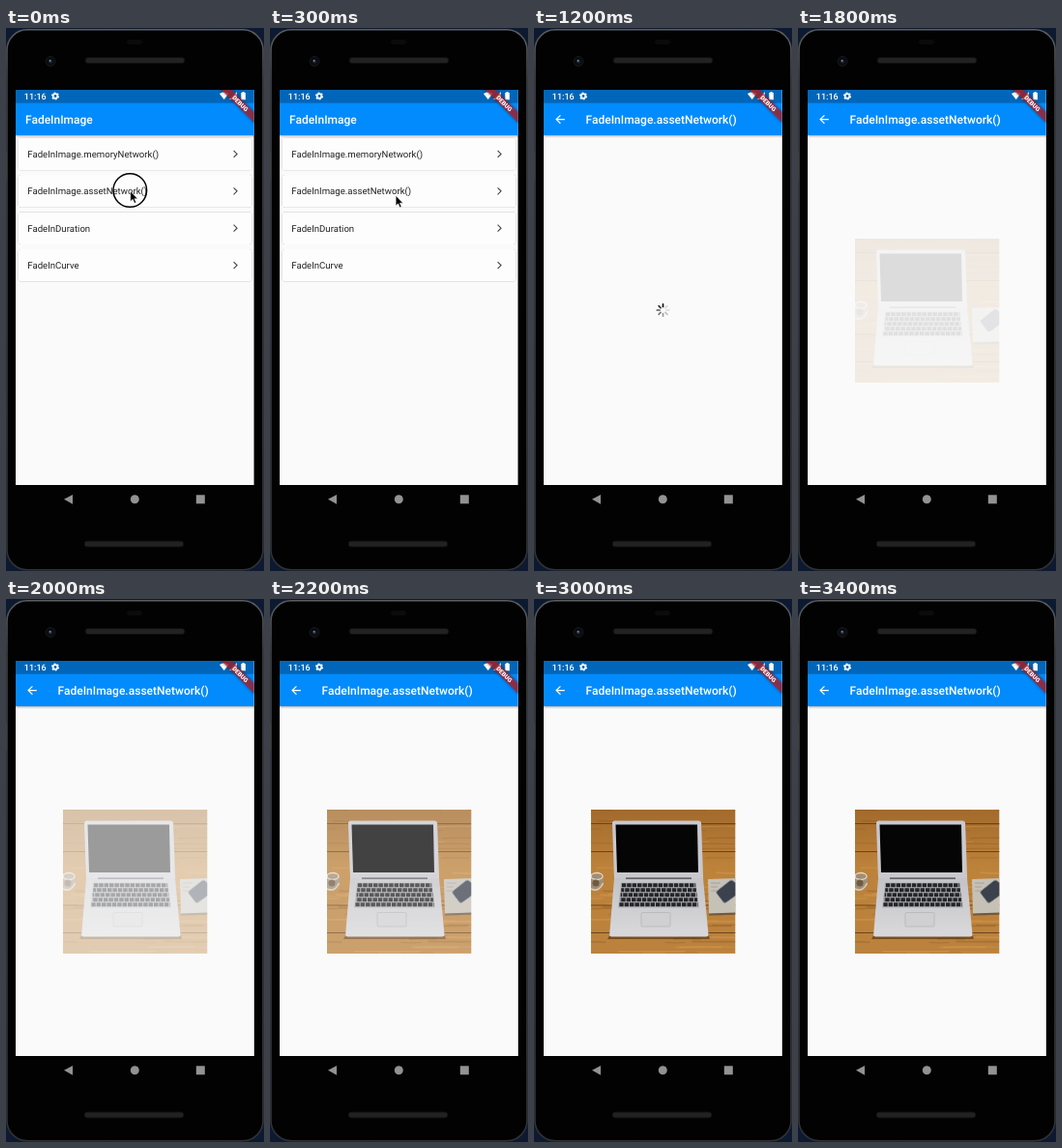
Write an HTML page that moves like this. It is 267 by 562 pixels and loops after 3500 ms.

```html
<!DOCTYPE html>
<html lang="en">
<head>
<meta charset="utf-8">
<title>FadeInImage demo</title>
<style>
  html, body { margin: 0; width: 100%; height: 100%; overflow: hidden; background: #0d1930; }
  svg { display: block; width: 267px; height: 562px; }
  text { font-family: Roboto, sans-serif; text-rendering: geometricPrecision; }
  .title { font-size: 12px; font-weight: 500; fill: #fff; }
  .item { font-size: 9.6px; fill: #222; }
  .card { fill: #fdfdfd; filter: drop-shadow(0 .6px .7px #0006); }
  .bar { fill: #028bfd; filter: drop-shadow(0 1px 1.2px #0005); }
</style>
</head>
<body>
<svg viewBox="0 0 267 562">
  <defs>
    <clipPath id="screen"><rect x="10" y="64" width="246.6" height="409"/></clipPath>
    <clipPath id="frame"><rect x="59" y="218" width="149.3" height="149"/></clipPath>
    <linearGradient id="rim" x2="0" y2="1">
      <stop offset="0" stop-color="#5c5d5f"/><stop offset=".1" stop-color="#3d3e40"/>
      <stop offset="1" stop-color="#303133"/>
    </linearGradient>
    <linearGradient id="wood" x2="0" y2="1">
      <stop offset="0" stop-color="#a26a2c"/><stop offset=".4" stop-color="#bd823a"/>
      <stop offset="1" stop-color="#bb823d"/>
    </linearGradient>
    <linearGradient id="metal" x2="0" y2="1">
      <stop offset="0" stop-color="#c3c3c8"/><stop offset="1" stop-color="#d9d8da"/>
    </linearGradient>
  </defs>

  <!-- phone -->
  <rect width="267" height="562" fill="#0d1930"/>
  <path d="M0 128h1.5v29H0z" fill="#4a4b4d"/>
  <rect x="1" y="1.8" width="265" height="559" rx="21" fill="#020202" stroke="url(#rim)" stroke-width="1.6"/>
  <rect x="125" y="12" width="16" height="5" rx="2.5" fill="#0b0b0d"/>
  <rect x="82" y="30.5" width="103" height="6" rx="3" fill="#222223" stroke="#0e0e0f"/>
  <rect x="81" y="531" width="103" height="6" rx="3" fill="#222223" stroke="#0e0e0f"/>
  <circle cx="46" cy="34.5" r="5" fill="#0b0c10" stroke="#17181b"/>
  <circle cx="46" cy="34.5" r="2" fill="#1c2738"/>
  <circle cx="45.6" cy="33.8" r=".9" fill="#8d99ad"/>
  <g fill="#929292">
    <path d="M60 487.8l9-4.9v9.8z"/>
    <circle cx="133.3" cy="487.8" r="4.5"/>
    <rect x="196.8" y="483.3" width="9" height="9"/>
  </g>

  <g clip-path="url(#screen)">
    <g id="home">
      <rect x="10" y="63" width="248" height="411" fill="#fafafa"/>
      <g id="list"></g>
      <rect class="bar" x="10" y="63" width="248" height="48"/>
      <text class="title" x="20" y="99.2">FadeInImage</text>
    </g>

    <g id="page">
      <rect x="10" y="63" width="248" height="411" fill="#fafafa"/>
      <rect class="bar" x="10" y="63" width="248" height="48"/>
      <path d="M31.8 94.6h-8.6m4.2-4.3l-4.3 4.3 4.3 4.3" fill="none" stroke="#fff" stroke-width="1.2"/>
      <text class="title" x="53.6" y="99.2">FadeInImage.assetNetwork()</text>
      <g id="spinner" stroke="#111" stroke-width="1.7" stroke-linecap="round"></g>

      <g id="photo" clip-path="url(#frame)">
        <rect x="59" y="218" width="150" height="149" fill="url(#wood)"/>
        <g id="grain"></g>
        <path d="M59 232.5h150M59 261.5h150M59 317h150M59 345.5h150" stroke="#6d431b"/>
        <path d="M78 348.5h103l1 3.5H76z" fill="#5d3816" opacity=".7"/>
        <path d="M81 232q0-2.5 2.5-2.5h87q2.5 0 2.6 2.5l2 57.5H83z" fill="#c9c8ce"/>
        <path d="M84.5 233.5h84.5l1 49.5H86z" fill="#050506"/>
        <path d="M83 289h92l5.5 58q0 2.5-2.5 2.5H80.5q-2.500 0-2.300-2.500z" fill="url(#metal)"/>
        <path d="M95 288.3h68v1.800H95z" fill="#67676c"/>
        <path d="M90 293.5h77.500l3.500 26H87z" fill="#b3b3b7"/>
        <g id="keys" stroke="#242529" stroke-width="4" stroke-dasharray="4.5 .9"></g>
        <rect x="111" y="324.5" width="30" height="14.5" rx="1" fill="#d0d0d3" stroke="#b2b2b6" stroke-width=".7"/>
        <circle cx="64.5" cy="292.5" r="7.8" fill="#a08e76"/>
        <ellipse cx="65" cy="287" rx="6" ry="3.5" fill="none" stroke="#dcd6cc" stroke-width="1.4"/>
        <path d="M59 300q8 4 12.500-6" fill="none" stroke="#d3cbbd" stroke-width="1.6"/>
        <circle cx="64" cy="294" r="3.5" fill="#6f5a42"/>
        <path d="M180 290l29-1v36l-28 1z" fill="#c6c1b6"/>
        <path d="M181 325.5l28-1v2.2l-28 .8z" fill="#73583a"/>
        <path d="M183 294h10m-10 4h7m-7 4h6" stroke="#99958d" stroke-width=".7"/>
        <path d="M189.500 302l13-10.300q1.800-1.300 3.500 0l3.500 2.800v12l-10.500 7.500q-2 1.200-3.300-.6l-6.500-8.500q-1-1.600.3-2.900z"
          fill="#3b424e" stroke="#8d929a" stroke-width=".8"/>
      </g>
    </g>

    <!-- status bar -->
    <rect x="10" y="63" width="248" height="14.7" fill="#000" opacity=".27"/>
    <text x="18.800" y="74" font-size="9" font-weight="500" fill="#fff">11:16</text>
    <circle cx="51" cy="70.5" r="2.3" fill="none" stroke="#fff" stroke-width="1.7"/>
    <circle cx="51" cy="70.5" r="3.5" fill="none" stroke="#fff" stroke-width="1.1" stroke-dasharray="1.83"/>
    <g fill="#fff">
      <path d="M221 68q4.7-3.5 9.4 0l-4.7 6z"/>
      <path d="M239 66v8h-8z"/>
      <path d="M243.3 67h1.2v-1h2.2v1h1.2v7.3h-4.6z"/>
    </g>
    <g transform="translate(256.7 63.8) rotate(45)">
      <rect x="-25" y="16.5" width="50" height="7.6" fill="#a51c24" opacity=".82"
        style="filter:drop-shadow(0 0 1.5px #0008)"/>
      <text y="22.5" font-size="6.3" font-weight="900" fill="#fff" text-anchor="middle">DEBUG</text>
    </g>
  </g>

  <circle id="tap" cx="128.3" cy="168" r="17.3" fill="none" stroke="#000" stroke-width="1.5"/>
  <path id="cursor" d="M0 0v10.500l2.400-2.200 1.800 4 1.700-.8-1.800-3.800h3.300z" stroke="#fff" stroke-width=".5"/>
</svg>

<script>
const $ = id => document.getElementById(id);
const LOOP = 3500, STEP = 100, SPOKES = 8;
const clamp = x => Math.min(1, Math.max(0, x));
const span = (t, start, length) => clamp((t - start) / length);
const repeat = (n, make) => Array.from({ length: n }, (_, i) => make(i)).join('');

// Cubic bezier easing, solved by bisection
function bezier(x1, y1, x2, y2) {
  const at = (a, b, s) => 3 * a * s * (1 - s) ** 2 + 3 * b * s * s * (1 - s) + s ** 3;
  return x => {
    if (x <= 0 || x >= 1) return clamp(x);
    let lo = 0, hi = 1;
    for (let i = 0; i < 24; i++) {
      const mid = (lo + hi) / 2;
      if (at(x1, x2, mid) < x) lo = mid; else hi = mid;
    }
    return at(y1, y2, lo);
  };
}
const easeIn = bezier(.42, 0, 1, 1);
const easeOut = bezier(0, 0, .58, 1);
const fastOutSlowIn = bezier(.4, 0, .2, 1);

const items = ['FadeInImage.memoryNetwork()', 'FadeInImage.assetNetwork()', 'FadeInDuration', 'FadeInCurve'];
$('list').innerHTML = items.map((label, i) => {
  const y = 113.7 + i * 38.4;
  return `<rect class="card" x="12.7" y="${y}" width="241.6" height="33.6" rx="2.4"/>
    <text class="item" x="22.3" y="${y + 20}">${label}</text>
    <path d="M235.6 ${y + 13.2}l3.5 3.5-3.5 3.5" fill="none" stroke="#444" stroke-width="1.1"/>`;
}).join('');

// Wood grain: seeded soft streaks
let seed = 7;
const random = () => (seed = seed * 16807 % 2147483647) / 2147483647;
$('grain').innerHTML = repeat(70, i => {
  const x = 40 + random() * 150, y = 218 + random() * 149, length = 20 + random() * 50;
  return `<path d="M${x} ${y}q${length / 2} ${random() * 3 - 1.5} ${length} 0" fill="none"
    stroke="${i % 2 ? '#d9a25a' : '#83531f'}" stroke-width="${.6 + random() * 1.4}" opacity=".35"/>`;
});

$('keys').innerHTML = repeat(5, i =>
  `<path d="M${90.8 - i * .6} ${296.3 + i * 5}H${167.3 + i * .6}" stroke-dashoffset="${i * 1.4}"/>`);

$('spinner').innerHTML = repeat(SPOKES, i =>
  `<path d="M0-3.5v-2.7" transform="rotate(${i * 360 / SPOKES})"/>`);
$('spinner').setAttribute('transform', 'translate(133.5 292)');
const spokes = [...$('spinner').children];

// Pointer path: time, x, y
const path = [[0, 128.8, 169], [200, 129, 170], [500, 132.6, 180.5], [600, 139, 212], [700, 158, 285], [800, 200, 400]];
function pointer(t) {
  const i = path.findIndex(p => p[0] > t);
  if (i < 0) return path[path.length - 1].slice(1);
  const [t0, x0, y0] = path[i - 1], [t1, x1, y1] = path[i];
  const k = (t - t0) / (t1 - t0);
  return [x0 + (x1 - x0) * k, y0 + (y1 - y0) * k];
}

function draw(t) {
  const open = span(t, 305, 300);
  $('page').setAttribute('opacity', easeIn(open));
  $('page').setAttribute('transform', `translate(0 ${102.4 * (1 - fastOutSlowIn(open))})`);

  const head = Math.round((t - 1200) / STEP);
  spokes.forEach((spoke, i) => {
    const age = (((head - i) % SPOKES) + SPOKES) % SPOKES;
    spoke.setAttribute('opacity', Math.max(.14, 1 - age * .15));
  });
  $('spinner').setAttribute('opacity', 1 - easeOut(span(t, 1295, 300)));
  $('photo').setAttribute('opacity', easeIn(span(t, 1595, 720)));

  $('tap').setAttribute('visibility', t < 300 ? 'visible' : 'hidden');
  $('cursor').setAttribute('visibility', t < 900 ? 'visible' : 'hidden');
  $('cursor').setAttribute('transform', `translate(${pointer(t)})`);
}

const start = performance.now();
function tick() {
  const t = (performance.now() - start) % LOOP;
  draw(Math.floor(t / STEP) * STEP);
  requestAnimationFrame(tick);
}
tick();
</script>
</body>
</html>
```
